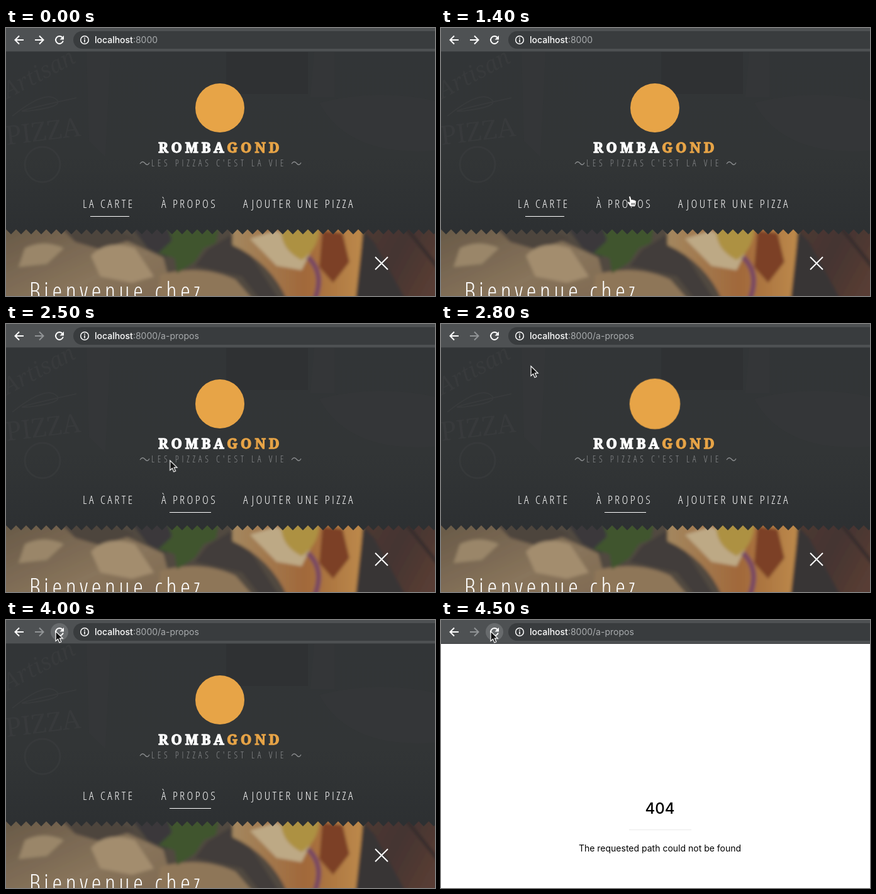
These frames come from a looping animation (682 px wide and 426 px high, 5500 ms). An HTML page:

```html
<!DOCTYPE html>
<html lang="fr">
<head>
<meta charset="utf-8">
<title>Pizzeria</title>
<style>
html, body { margin: 0; width: 100%; height: 100%; overflow: hidden; background: #2f3234; }
svg { display: block; width: 682px; height: 426px; }
text { white-space: pre; }

.ui { font-family: Inter, Roboto, sans-serif; font-size: 14px; }
.narrow { font-family: "Open Sans Condensed Light", "Open Sans", "Noto Sans", sans-serif; font-stretch: 75%; font-weight: 300; }
.nav { font-size: 19px; letter-spacing: 3.4px; fill: #fff; }
.tagline { font-size: 14.5px; letter-spacing: 4.7px; fill: #8b8d8f; }
.title { font-size: 40px; letter-spacing: 5.6px; fill: #fff; }
.wide .nav, .wide .tagline, .wide .title { letter-spacing: 0; }
.brand { font: 900 22px "Noto Serif", "Liberation Serif", serif; letter-spacing: 5px; }
.brand tspan { stroke-width: 1.3; }
.line { fill: none; stroke: #fff; stroke-width: 2; }

/* One loop is 5.5 s; motion advances every 100 ms. */
.home, .about, .forward, .hover, .error, .arrow, .hand { animation: 5.5s step-end infinite; }
.home { animation-name: home; }
.about { animation-name: about; }
.forward { animation-name: dim; }
.hover { animation-name: hover; }
.error { animation-name: error; }
.arrow { animation-name: arrow; }
.hand { animation-name: hand; }
.pointer { animation: travel 5.5s infinite; }
.logo { transform-origin: 340px 127px; animation: swell 5.5s infinite; }

@keyframes home { 0% { visibility: visible } 34.545%, 100% { visibility: hidden } }
@keyframes about { 0% { visibility: hidden } 34.545%, 100% { visibility: visible } }
@keyframes dim { 0% { stroke: #fff } 34.545%, 100% { stroke: #919496 } }
@keyframes hover { 0% { visibility: hidden } 58.181%, 100% { visibility: visible } }
@keyframes error { 0% { visibility: hidden } 81.818%, 100% { visibility: visible } }
@keyframes arrow { 0%, 45.454%, 100% { visibility: visible } 21.818% { visibility: hidden } }
@keyframes hand { 0%, 45.454%, 100% { visibility: hidden } 21.818% { visibility: visible } }
@keyframes travel {
  0% { transform: translate(318px, 430px); animation-timing-function: step-end }
  3.636% { transform: translate(318px, 430px); animation-timing-function: steps(5) }
  12.727% { transform: translate(296px, 244px); animation-timing-function: steps(5) }
  21.818% { transform: translate(300px, 267px); animation-timing-function: step-end }
  43.636% { transform: translate(300px, 267px); animation-timing-function: steps(4) }
  50.909% { transform: translate(143px, 67px); animation-timing-function: steps(5) }
  60%, 100% { transform: translate(79px, 18px); animation-timing-function: step-end }
}
@keyframes swell {
  0% { transform: scale(1); animation-timing-function: step-end }
  45.454% { transform: scale(1); animation-timing-function: steps(2) }
  49.09% { transform: scale(1.05); animation-timing-function: steps(3) }
  54.545%, 100% { transform: scale(1); animation-timing-function: step-end }
}
</style>
</head>
<body>
<svg viewBox="0 0 682 426" xmlns="http://www.w3.org/2000/svg">
  <defs>
    <linearGradient id="wood" x2="1" y2=".5">
      <stop offset="0" stop-color="#503a34"/>
      <stop offset=".5" stop-color="#443431"/>
      <stop offset="1" stop-color="#593d34"/>
    </linearGradient>
    <linearGradient id="crust" x2="1">
      <stop offset="0" stop-color="#a3875f"/>
      <stop offset=".55" stop-color="#a1683a"/>
      <stop offset="1" stop-color="#bd8a4b"/>
    </linearGradient>
    <linearGradient id="cheese" x2="1" y2="1">
      <stop offset="0" stop-color="#655746"/>
      <stop offset=".6" stop-color="#88745b"/>
      <stop offset="1" stop-color="#7e6850"/>
    </linearGradient>
    <linearGradient id="wall" x2="0" y2="1">
      <stop offset="0" stop-color="#323537"/>
      <stop offset=".6" stop-color="#323536"/>
      <stop offset="1" stop-color="#2d3032"/>
    </linearGradient>
    <pattern id="teeth" y="320" width="16" height="8" patternUnits="userSpaceOnUse">
      <path d="M0 0H16L8 8Z" fill="#2d3032"/>
    </pattern>
    <filter id="soft" x="-5%" y="-5%" width="110%" height="110%"><feGaussianBlur stdDeviation="2.5"/></filter>
  </defs>

  <g filter="url(#soft)">
    <path d="M-10 310H700V440H-10Z" fill="#514841"/>
    <path d="M-10 310H130L250 365 270 440H-10Z" fill="url(#cheese)"/>
    <path d="M80 310H150L205 335 150 352 110 340Z" fill="#4d443e"/>
    <path d="M30 350Q60 335 92 350L65 375 20 380Z" fill="#9a8669"/>
    <path d="M135 362Q160 335 205 350L235 395 200 405 150 395Z" fill="#a38d6e"/>
    <path d="M195 310H270L255 365 225 350Z" fill="#3a393a"/>
    <path d="M245 392Q310 375 365 400L400 440H240Z" fill="#8e7658"/>
    <path d="M320 352L365 325 440 440H410L375 395 300 378Z" fill="#423d3a"/>
    <path d="M255 310H340L334 342 315 350 300 372 272 390 268 366 242 358 264 338Z" fill="#3f542f"/>
    <path d="M360 310H568L558 440H450Q425 375 360 345Z" fill="url(#crust)"/>
    <path d="M388 335L430 322 485 355 470 385 430 378Z" fill="#bda985"/>
    <path d="M438 310H498Q500 350 470 369Q432 350 438 310Z" fill="#ad9143"/>
    <path d="M503 322L535 326 546 372 520 405 498 380Z" fill="#7c4025"/>
    <path d="M480 364Q510 393 487 440" fill="none" stroke="#794962" stroke-width="8"/>
    <path d="M570 310H700V440H558Z" fill="url(#wood)"/>
    <path d="M568 322L585 340 640 440H555Z" fill="#393536"/>
    <path d="M630 310L690 385" stroke="#30292b" stroke-width="5"/>
  </g>

  <path d="M0 37H682V320H0Z" fill="url(#wall)"/>
  <path d="M0 320H682V328H0Z" fill="url(#teeth)"/>
  <g opacity=".5">
    <path d="M128 38H166L158 205 132 180ZM490 38H522V110H484Z" fill="#37393a"/>
    <path d="M498 119Q590 95 682 116V195Q545 205 498 119Z" fill="#37393a"/>
    <path d="M350 38H480V105H350Z" fill="#2c2f31"/>
    <g fill="#3e4142" font-family="Noto Serif, serif">
      <text transform="translate(2 113) rotate(-28)" font-size="36" font-style="italic">Artisan</text>
      <text transform="translate(1 186) rotate(-7)" font-size="42">PIZZA</text>
    </g>
    <path d="M10 140Q60 100 78 112T42 131 112 111" fill="none" stroke="#3e4142" stroke-width="2"/>
    <circle cx="58" cy="217" r="28" fill="none" stroke="#3c3f40" stroke-width="3"/>
  </g>

  <circle class="logo" cx="340" cy="127" r="39" fill="#e7a447"/>
  <text class="brand" x="341" y="198" text-anchor="middle"><tspan fill="#fff" stroke="#fff">ROMBA</tspan><tspan fill="#e7a447" stroke="#e7a447">GOND</tspan></text>
  <text class="narrow tagline" x="231" y="220">LES PIZZAS C'EST LA VIE</text>
  <path d="M213 216Q217 210 221 215T228 214M454 216Q458 210 462 215T469 214" fill="none" stroke="#8b8d8f" stroke-width="1.3"/>

  <text class="narrow nav" x="122" y="286">LA CARTE</text>
  <text class="narrow nav" x="247" y="286">À PROPOS</text>
  <text class="narrow nav" x="377" y="286">AJOUTER UNE PIZZA</text>
  <path class="home" d="M134 299H196V300H134Z" fill="#fff"/>
  <path class="about" d="M260 299H326V300H260Z" fill="#fff"/>

  <text class="narrow title" x="37" y="433">Bienvenue chez</text>
  <path class="line" d="M587 364L607 384M607 364L587 384"/>

  <g class="error ui" text-anchor="middle">
    <path d="M0 38H682V426H0Z" fill="#fff"/>
    <text x="348" y="308" font-size="24" font-weight="500">404</text>
    <path d="M299 333H398V334H299Z" fill="#eaeaea"/>
    <text x="348" y="368">The requested path could not be found</text>
  </g>

  <path d="M0 0H682V38H0Z" fill="#4e5153"/>
  <path d="M0 37H682V38H0Z" fill="#3b3e40"/>
  <path d="M682 5H121A14 14 0 0 0 121 33H682Z" fill="#393c3e"/>
  <circle class="hover" cx="85" cy="19" r="14" fill="#686b6d"/>
  <path class="line" d="M28 19H15M21 12.5L14.5 19 21 25.5"/>
  <path class="line forward" d="M46 19H59M53 12.5L59.5 19 53 25.5"/>
  <path class="line" d="M89.5 15A6 6 0 1 0 90.8 20.5"/>
  <path d="M92 12V18.5H85.5Z" fill="#fff"/>
  <circle class="line" cx="125" cy="19" r="6.3" style="stroke-width:1.5"/>
  <path d="M124.2 15.3H125.8V16.9H124.2ZM124.2 18.1H125.8V22.7H124.2Z" fill="#fff"/>
  <g class="ui" fill="#a9acae">
    <text x="141" y="24"><tspan fill="#fff" font-weight="500">localhost</tspan>:8000<tspan class="about">/a-propos</tspan></text>
  </g>

  <g class="pointer">
    <path class="arrow" d="M0 0V15.5L3.6 12.2 6 18 8.8 16.8 6.4 11.2H11.2Z" fill="#111" stroke="#fff" stroke-width="1.2"/>
    <g class="hand" stroke="#222" stroke-width=".9" stroke-linejoin="round">
      <path d="M-1.5 1Q0-1 1.5 1L3 6Q4.5 4.5 5.5 6.2Q7.2 5 8.2 7Q10 6.3 10.3 8.5L10 13 8.5 17H1L-3.8 10.5Q-3.8 8-1.2 9.2L0 10Z" fill="#fff"/>
      <path d="M3.2 11V14.5M5.3 11V14.5M7.4 11V14.5" fill="none"/>
    </g>
  </g>
</svg>
<script>
// Drop the tracking when only a regular-width face is installed.
const sample = document.querySelector('.nav');
document.documentElement.classList.toggle('wide', sample.getComputedTextLength() > 98);
</script>
</body>
</html>
```
